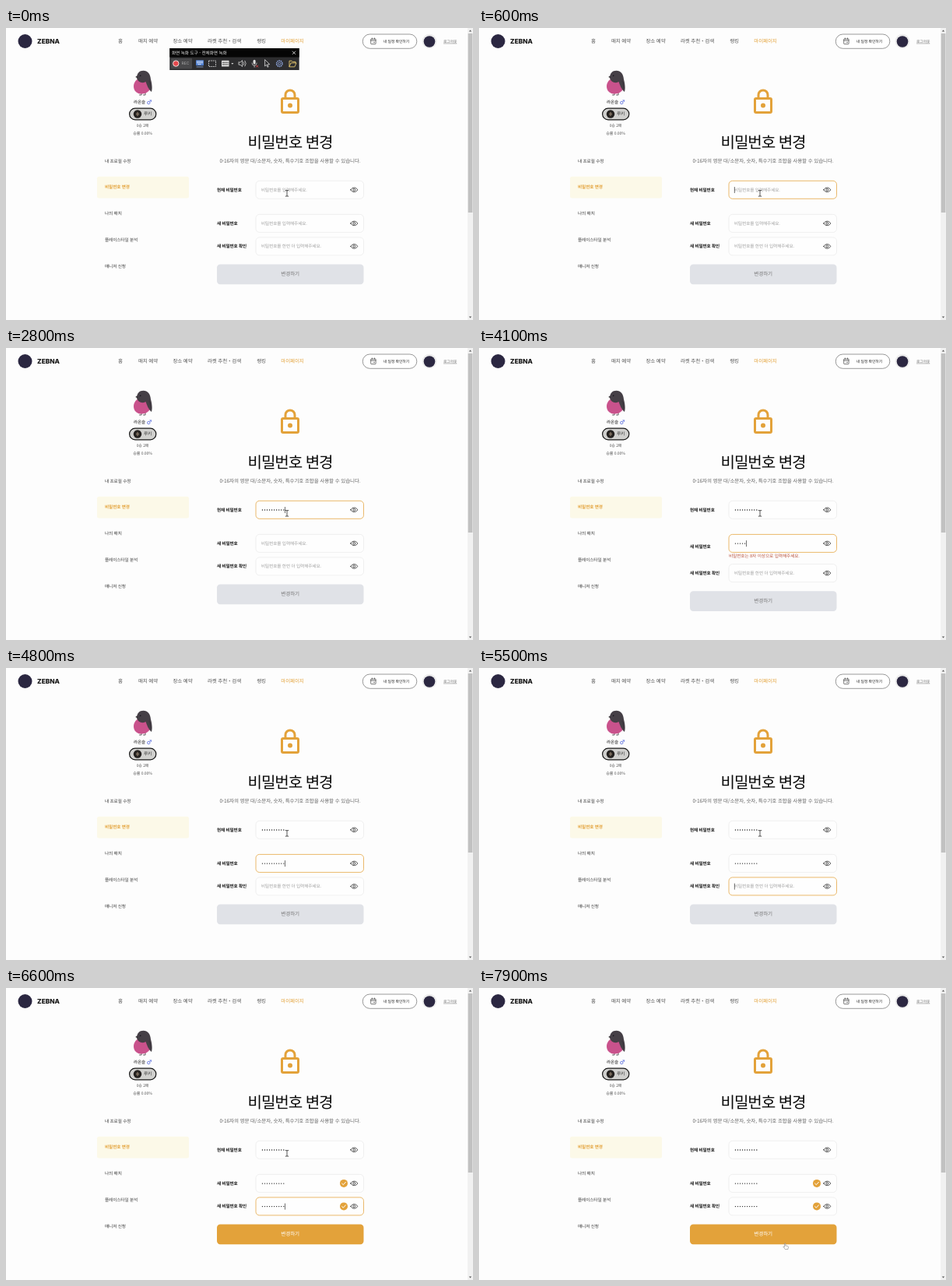
An HTML page for the animation above (8000 ms loop, 600x375 px).

```html
<!DOCTYPE html>
<html lang="ko">
<head>
<meta charset="utf-8">
<style>
  html, body { margin: 0; width: 100%; height: 100%; overflow: hidden; background: #fdfdfd; }
  svg { display: block; width: 100vw; height: 100vh; }
  text { font-family: "Noto Sans CJK KR", "Noto Sans CJK", sans-serif; letter-spacing: -.02em; white-space: pre; text-rendering: geometricPrecision; }
  .latin { font-family: Inter, sans-serif; letter-spacing: 0; }
  .title { letter-spacing: -.055em; }
  .line { fill: none; stroke-linecap: round; stroke-linejoin: round; }
</style>
</head>
<body>
<svg id="stage" viewBox="0 0 600 375"></svg>
<script>
const LOOP = 8000, ORANGE = '#e3a23a', PITCH = 3.03, ERROR_SHIFT = 8.7;
const stage = document.getElementById('stage');

// y is the vertical middle of the text
const text = (x, y, str, size, fill = '#333', extra = '') =>
  `<text x="${x}" y="${y + size * .36}" font-size="${size}" fill="${fill}" ${extra}>${str}</text>`;
const mid = (x, y, str, size, fill, extra = '') =>
  text(x, y, str, size, fill, `text-anchor="middle" ${extra}`);
const rect = (x, y, w, h, r, fill, extra = '') =>
  `<rect x="${x}" y="${y}" width="${w}" height="${h}" rx="${r}" fill="${fill}" ${extra}/>`;
const circle = (x, y, r, fill, extra = '') =>
  `<circle cx="${x}" cy="${y}" r="${r}" fill="${fill}" ${extra}/>`;
const line = (d, stroke, width = .8, extra = '') =>
  `<path class="line" d="${d}" stroke="${stroke}" stroke-width="${width}" ${extra}/>`;
const shape = (d, fill, extra = '') => `<path d="${d}" fill="${fill}" ${extra}/>`;

const header = () => {
  const nav = [['홈', 147], ['매치 예약', 182.5], ['장소 예약', 227], ['라켓 추천・검색', 280.5], ['랭킹', 328], ['마이페이지', 368]];
  return circle(24.5, 17, 9, '#2b2741') +
    text(40, 17, 'ZEBNA', 8.3, '#111', 'class="latin" font-weight="800"') +
    nav.map(([label, x], i) => mid(x, 16.8, label, 6.5, i === 5 ? ORANGE : '#555')).join('') +
    rect(458.3, 8, 69.5, 18.3, 9.1, '#fff', 'stroke="#555" stroke-width=".6"') +
    rect(468.7, 14, 6.4, 6.6, .6, 'none', 'stroke="#444" stroke-width=".7"') +
    line('M468.7 16h6.4M470.3 13v1M473.5 13v1M472.5 18.4h1', '#444', .8) +
    mid(501.5, 17, '내 일정 확인하기', 4.9, '#222', 'font-weight="500"') +
    circle(544, 17, 9.3, '#ececec') + circle(544, 17.5, 7.3, '#2b2741') +
    text(562, 17, '로그아웃', 4.8, '#666', 'text-decoration="underline"');
};

const bird = () =>
  line('M174 82v4h-2.5M179 82v4h-2.5', '#3c3238', .8) +
  shape('M168.5 66C162 71 162.5 81 170 84 179 86.5 187 81 186.5 72 186 66 181 63 176 64z', '#c9528c') +
  shape('M168 64.5C168 58 171.5 54.8 176.5 54.8 182 54.8 185.5 59 186 66 187.5 71 188.3 78 187 82 183 79 181 73 179.5 69 175 71.5 170 70 168 64.5z', '#453f46') +
  line('M184 68c1 4 2 7 2.2 10', '#2f2a33', .6) +
  circle(172.7, 61.2, .8, '#141118') + shape('M168.6 61.3l-2.4 1.7 2.4 1z', '#2a2528');

const profile = () => bird() +
  mid(171.5, 95.1, '라온슬', 5.55, '#111', 'font-weight="500"') +
  circle(183.3, 96, 1.7, 'none', 'stroke="#5268dc" stroke-width=".8"') +
  line('M184.6 94.7l1.8-1.8M184.8 92.8h1.7v1.7', '#5268dc', .7) +
  rect(158.6, 103.2, 34.2, 14.6, 7.3, '#d0d0ce', 'stroke="#161616" stroke-width="1.2"') +
  circle(169, 110.5, 5.2, '#24211f') + shape('M169 107.5l2.2 3-2.2 3-2.2-3z', '#75685a') +
  text(177, 110.4, '루키', 5.7, '#333') +
  mid(175.5, 124.8, '0승 2패', 5, '#555') +
  mid(175.5, 135.4, '승률 0.00%', 5.1, '#555');

const sidebar = () => rect(117, 190.7, 118, 27.8, 2.5, '#fcf9e8') +
  ['내 프로필 수정', '비밀번호 변경', '나의 매치', '플레이스타일 분석', '매니저 신청'].map((label, i) =>
    text(127, 170.6 + i * 33.75, label, 5.65, i === 1 ? ORANGE : '#3a3a3a', `font-weight="${i === 1 ? 700 : 500}"`)).join('');

const heading = () =>
  rect(354.5, 90.4, 21, 18, 1.5, 'none', `stroke="${ORANGE}" stroke-width="3"`) +
  `<path d="M359 90.4V85.9a6 6 0 0 1 12 0V90.4" fill="none" stroke="${ORANGE}" stroke-width="3"/>` +
  circle(365, 99.4, 3, ORANGE) +
  mid(365, 146.7, '비밀번호 변경', 20.1, '#0a0a0a', 'class="title"') +
  mid(365, 170.8, '0-16자의 영문 대/소문자, 숫자, 특수기호 조합을 사용할 수 있습니다.', 6.55, '#666');

const scrollbar = () => rect(593, 0, 7, 375, 0, '#f1f1f1') + rect(593.7, 7, 5.7, 230, 0, '#c1c1c1') +
  shape('M594.8 4.6l1.7-2 1.7 2z', '#555') + shape('M594.8 370.4l1.7 2 1.7-2z', '#555');

const recorder = () => {
  const c = '#ddd';
  return '<g id="recorder">' + rect(210.3, 26, 166.4, 28, 0, '#2d2d2f') + rect(210.3, 26, 166.4, 11.5, 0, '#050505') +
    text(213, 31.8, '화면 녹화 도구 - 전체화면 녹화', 5.7, '#eee') +
    line('M368.2 30l3.6 3.6M371.8 30l-3.6 3.6', '#eee', .8) +
    rect(212, 38.8, 27, 13.8, 1, '#48484a') +
    circle(218.3, 45.6, 3.7, '#e5484d', 'stroke="#f2dede" stroke-width="1"') +
    text(225.5, 45.6, 'REC', 5, '#aaa', 'class="latin"') +
    rect(244, 41.2, 10, 7, .6, '#4f7fd0') + line('M245.5 43h7M245.5 44.8h7M247 46.6h4', '#fff', .8, 'stroke-dasharray="1 1"') +
    line('M245 50h8', '#9ab8ee', .7) +
    rect(260.5, 42, 9, 7.5, 0, 'none', `stroke="${c}" stroke-width=".9" stroke-dasharray="1.6 1"`) +
    rect(277, 41.8, 9.5, 7.6, .5, c) + line('M278.3 44.3h7M278.3 46.8h7', '#444', 1, 'stroke-dasharray="1.3 1"') +
    shape('M289.4 45h3l-1.5 1.8z', c) +
    line('M299 44v3.2h2l2.6 2.4v-8L301 44zM305.3 43.8q1.3 1.8 0 3.6M307 42.2q2.6 3.4 0 6.8', c, .8) +
    rect(317.6, 40.8, 3, 5.8, 1.5, c) + line('M316 45q0 3.3 3.1 3.3t3.1-3.3M319.1 48.3v2', c, .7) +
    line('M321.5 48l2.2 2.2m0-2.2l-2.2 2.2', '#e5484d', .9) +
    line('M332.6 41v8l2-1.7 1.4 3 1.2-.6-1.4-2.8 2.6-.2z', c, .8) +
    circle(351.3, 45.7, 3.7, 'none', 'stroke="#8ea5dd" stroke-width="1.5" stroke-dasharray="1.6 .7"') +
    circle(351.3, 45.7, 1.6, 'none', 'stroke="#8ea5dd" stroke-width=".9"') +
    line('M364 49.5v-7.3h3l1 1.2h4v1.4M364 49.5l2-4.6h7l-2 4.6z', '#e4c66e', .9) + '</g>';
};

const FIELDS = [
  ['현재 비밀번호', 207.8, '비밀번호를 입력해주세요.', '비밀번호는 8자 이상으로 입력해주세요.'],
  ['새 비밀번호', 250.9, '비밀번호를 입력해주세요.', '비밀번호는 8자 이상으로 입력해주세요.'],
  ['새 비밀번호 확인', 280.4, '비밀번호를 한번 더 입력해주세요.', '비밀번호가 일치하지 않습니다.']
];

const field = ([label, y, hint, error], i) => `<g id="row${i}">` +
  `<g id="label${i}">${text(271, y - .2, label, 5.6, '#111', 'font-weight="600"')}</g>` +
  rect(321, y - 11.5, 138.5, 23, 4.6, '#fefefe', `id="box${i}"`) +
  text(328, y - .2, hint, 5.65, '#a0a0a0', `id="hint${i}"`) +
  `<g id="dots${i}">${Array.from({ length: 10 }, (_, k) => circle(329.5 + k * PITCH, y + .2, .72, '#222')).join('')}</g>` +
  rect(0, y - 3.8, .6, 8, 0, '#111', `id="caret${i}"`) +
  line(`M442.9 ${y}c2-3.7 6.8-3.7 8.8 0c-2 3.7-6.8 3.7-8.8 0z`, '#333', .85) +
  circle(447.3, y, 1.45, 'none', 'stroke="#333" stroke-width=".85"') +
  rect(442.2, y - 5.2, 10.3, 10.4, 1, 'none', `id="ring${i}" stroke="#222" stroke-width=".8"`) +
  `<g id="check${i}">${circle(434, y, 5, ORANGE)}${line(`M431.6 ${y + .1}l1.7 1.7 3.1-3.4`, '#fff', 1)}</g>` +
  text(321, y + 15.8, error, 5.7, '#b95440', `id="error${i}"`) + '</g>';

const button = () => '<g id="button">' + rect(271, 303.6, 188.5, 25.6, 4.2, '#e0e2e7', 'id="buttonBox"') +
  mid(365.2, 316.1, '변경하기', 6.6, '#777', 'id="buttonText"') + '</g>';

const cursors = () => '<g id="mouse">' +
  `<g id="beam">${line('M-1.8 -3.8h1.3q.5 0 .5 .6v6.4q0 .6 -.5 .6h-1.3M1.8 -3.8h-1.3q-.5 0 -.5 .6M0 3.2q0 .6 .5 .6h1.3', '#222', .75)}</g>` +
  `<g id="arrow">${shape('M0 0v7.6l1.8-1.7 1.3 2.8 1.1-.5-1.3-2.7h2.5z', '#fff', 'stroke="#222" stroke-width=".5"')}</g>` +
  `<g id="hand">${shape('M-1.4 -3.3q.7-.8 1.2 0v2.6l2.7.6q1 .3.9 1.2l-.5 2.9H-.6L-3 .9q0-1 1-.5l.7.6z', '#fff', 'stroke="#666" stroke-width=".5"')}</g></g>`;

stage.innerHTML = rect(0, 0, 600, 375, 0, '#fdfdfd') + header() + profile() + sidebar() + heading() +
  FIELDS.map(field).join('') + button() + scrollbar() + recorder() + cursors();

const ui = {};
stage.querySelectorAll('[id]').forEach(el => ui[el.id] = el);
const show = (el, on) => el.style.display = on ? '' : 'none';
const shift = (el, y) => el.setAttribute('transform', `translate(0 ${y})`);

// start of typing, length after each 100 ms, time the last character lands
const TYPING = [
  { start: 2100, counts: [1, 3, 4, 6, 7, 9], done: 2800 },
  { start: 3800, counts: [1, 2, 3, 5, 6, 7, 8, 9, 9], done: 4800 },
  { start: 5700, counts: [1, 2, 4, 5, 7, 8, 8, 9], done: 6600 }
];
const FOCUS = [[600, 3600], [3600, 5500], [5500, 7600]];
const EYE_FOCUS = [[3200, 3600], [5100, 5500], [-1, -1]];
const MOUSE = [[7100, 361, 212.3], [7200, 365, 220], [7300, 385, 250], [7400, 421, 300],
  [7500, 460, 342], [7600, 480, 357], [7700, 452, 349], [7800, 410, 337], [7900, 394, 331.6]];
const within = (t, [from, to]) => t >= from && t < to;

function typed(t, { start, counts, done }) {
  if (t < start) return 0;
  return t >= done ? 10 : counts[Math.min((t - start) / 100, counts.length - 1)];
}

function drawMouse(t) {
  const [, x, y] = MOUSE.filter(([at]) => at <= t).pop() || MOUSE[0];
  const inside = (left, right, top, bottom) => x > left && x < right && y > top && y < bottom;
  const kind = inside(271, 460, 303, 332) ? 'hand'
    : FIELDS.some(([, fy]) => inside(321, 440, fy - 12, fy + 12)) ? 'beam' : 'arrow';
  ui.mouse.setAttribute('transform', `translate(${x} ${y})`);
  ['beam', 'arrow', 'hand'].forEach(name => show(ui[name], name === kind));
}

function render(time) {
  const t = Math.floor(time / 100) * 100;
  const ready = t >= 6600;
  let offset = 0;
  FIELDS.forEach((_, i) => {
    const count = typed(t, TYPING[i]);
    const focused = within(t, FOCUS[i]), eye = within(t, EYE_FOCUS[i]);
    const error = count > 0 && count < 10;
    shift(ui['row' + i], offset);
    shift(ui['label' + i], error ? ERROR_SHIFT / 2 : 0);
    ui['box' + i].setAttribute('stroke', focused ? ORANGE : '#e6e6e6');
    ui['box' + i].setAttribute('stroke-width', focused ? .75 : .6);
    show(ui['hint' + i], !count);
    [...ui['dots' + i].children].forEach((dot, k) => show(dot, k < count));
    show(ui['caret' + i], focused && !eye && !within(t, [1200, 1700]));
    ui['caret' + i].setAttribute('x', 327.9 + count * PITCH);
    show(ui['ring' + i], eye);
    show(ui['check' + i], ready && i > 0);
    show(ui['error' + i], error);
    if (error) offset += ERROR_SHIFT;
  });
  shift(ui.button, offset);
  ui.buttonBox.setAttribute('fill', ready ? ORANGE : '#e0e2e7');
  ui.buttonText.setAttribute('fill', ready ? '#fff' : '#777');
  ui.recorder.style.opacity = t < 100 ? 1 : Math.max(0, 1 - t / 400);
  drawMouse(t);
}

const begin = performance.now();
function tick() {
  render((performance.now() - begin) % LOOP);
  requestAnimationFrame(tick);
}
tick();
</script>
</body>
</html>
```
